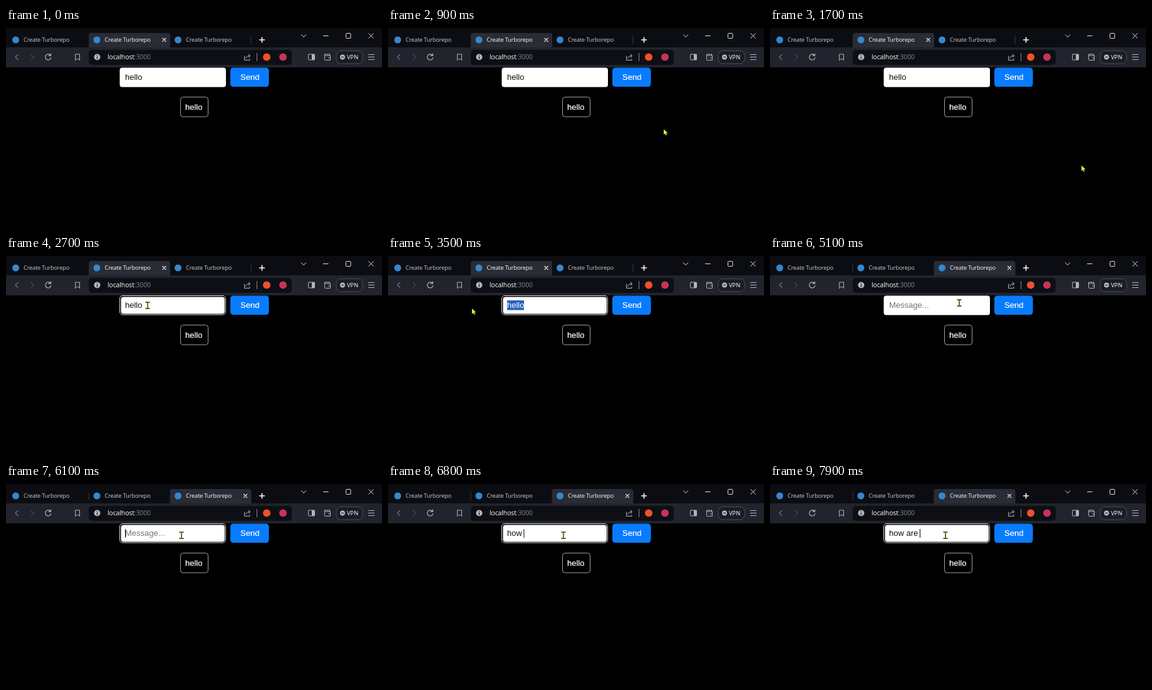
An HTML page that plays this animation: 600x320 px, repeating every 8000 ms.

```html
<!DOCTYPE html>
<html lang="en">
<head>
<meta charset="utf-8">
<title>Chat in browser tabs</title>
<style>
  html, body { margin: 0; width: 100%; height: 100%; overflow: hidden; background: #000; }
  svg { display: block; }
  text { font: 13px "Liberation Sans", Arial, sans-serif; white-space: pre; }
  .ui { font-family: "Open Sans", "Noto Sans", sans-serif; }
  .tab { font-size: 9.2px; letter-spacing: -.15px; }
  .bold { stroke: #fff; stroke-width: .2; }
  .line { fill: none; stroke: #b4b6bd; stroke-linecap: round; stroke-linejoin: round; }
  .thin { stroke-linecap: butt; stroke: #e4e4e8; }
</style>
</head>
<body>
<svg width="600" height="320" viewBox="0 0 600 320">
  <rect width="600" height="32" fill="#0c0d12"/>
  <g id="tabs"></g>
  <path class="line" d="M404.500 19h8M408.500 15v8" style="stroke:#fff;stroke-width:1.600"/>
  <path class="line thin" d="M471 10.500l4 4 4-4M506 12.500h8.500M578.500 8.500l8 8m0-8l-8 8"/>
  <rect class="line thin" x="542.500" y="8.500" width="7.500" height="8" rx="1"/>

  <!-- toolbar -->
  <rect y="31" width="600" height="32" fill="#21242c"/>
  <rect x="132" y="35" width="324" height="24" rx="5" fill="#0d0f14"/>
  <path class="line" d="M19 42.500l-4 4 4 4"/>
  <path class="line" d="M40 42.500l4 4-4 4" style="stroke:#5a5d66"/>
  <path class="line" d="M71 43.700a4.600 4.600 0 1 0 .8 4M71.500 41v3.200h-3.300" stroke-width="1.200"/>
  <path class="line" d="M111 42h6.500v9.500l-3.250-2.700-3.250 2.700z"/>
  <circle cx="145.500" cy="46.500" r="5" fill="#b4b6bd"/>
  <path d="M145.500 43.300v1.300m0 1.200v3.700" stroke="#0d0f14" stroke-width="1.300"/>
  <text class="ui" x="162" y="50" style="font-size:10.400px;letter-spacing:-.08px" fill="#fff">localhost<tspan fill="#83868f">:3000</tspan></text>
  <path class="line" d="M380.500 45v6.500h8.500v-2M382.500 48.500c.5-3 3-4 7-4m-2.700-2.700l2.900 2.700-2.900 2.700"/>
  <path class="line thin" d="M400.500 40v13" style="stroke:#8a8c94"/>
  <circle cx="416" cy="46.500" r="6" fill="#f0502c"/>
  <circle cx="442" cy="46.500" r="6" fill="#c73458"/>
  <rect class="line" x="482.500" y="42" width="10" height="9" rx="1.200"/>
  <path d="M488 42h4.500v9h-4.500z" fill="#b4b6bd"/>
  <path class="line" d="M516.500 44v-2h-8v8.500a1 1 0 0 0 1 1h8v-7.500h-9M514.500 47.800h3"/>
  <rect x="527" y="36.500" width="42" height="20.500" rx="7" fill="#1b1d24" stroke="#4b4e58"/>
  <circle cx="537" cy="46.500" r="4" fill="#b4b6bd"/>
  <path d="M535 46.500h4" stroke="#1b1d24" stroke-width="1.200"/>
  <text class="ui" x="544" y="50" style="font-size:9.300px" fill="#fff">VPN</text>
  <path class="line thin" d="M578 42.500h10m-10 4h10m-10 4h10" style="stroke:#b4b6bd"/>

  <!-- page -->
  <rect id="ring" x="181.500" y="63.500" width="169" height="30.500" rx="4.500" fill="#000" stroke="#dcdcdc"/>
  <rect id="field" rx="4" fill="#fff"/>
  <rect id="selection" x="190" y="71" width="27" height="15.500" fill="#2a60bd"/>
  <text id="value" x="190" y="83"></text>
  <path id="caret" d="M0 72v14" stroke="#000"/>
  <rect x="358" y="63.500" width="61.500" height="30.500" rx="4.500" fill="#087bff"/>
  <text class="bold" x="374" y="83.300" fill="#fff">Send</text>
  <rect x="278.500" y="110.500" width="44" height="31.500" rx="4" fill="#000" stroke="#a0a0a0"/>
  <text class="bold" x="286" y="131" fill="#fff">hello</text>

  <path id="arrow" d="M0 0v8.800l2-1.700 1.500 3 1.500-.8-1.400-2.800 2.900-.2z" fill="#d6f233"/>
  <path id="beam" d="M-3.500-5h2.500q1 0 1 1 0-1 1-1h2.500M0-4v8M-3.500 5h2.500q1 0 1-1 0 1 1 1h2.500" fill="none" stroke="#4e6a20" stroke-width="1.800"/>
</svg>
<script>
const LOOP = 8000;
const $ = id => document.getElementById(id);
const show = (id, on) => $(id).setAttribute("visibility", on ? "visible" : "hidden");
const set = (id, attrs) => Object.entries(attrs).forEach(([k, v]) => $(id).setAttribute(k, v));
const move = (id, x, y) => set(id, { transform: `translate(${x} ${y})` });

// [time, x, y, shape]; the pointer holds its place until the next entry
const pointer = [
  [500, 405, 119, "arrow"], [900, 440, 162, "arrow"], [1400, 466, 176, "arrow"],
  [1500, 480, 186, "arrow"], [1700, 497, 220, "arrow"], [1800, 462, 203, "arrow"],
  [1900, 410, 178, "arrow"], [2000, 355, 151, "arrow"], [2500, 252, 80, "beam"],
  [2700, 226, 79, "beam"], [2900, 212, 78, "beam"], [3200, 192, 78, "beam"],
  [3500, 134, 84, "arrow"], [3900, 160, 76, "arrow"], [4000, 205, 58, "arrow"],
  [4100, 252, 41, "arrow"], [4200, 290, 30, "arrow"], [4300, 306, 26, "arrow"],
  [4700, 306, 28, "arrow"], [5000, 304, 66, "beam"], [5100, 302, 75, "beam"],
  [5500, 286, 80, "beam"], [5600, 280, 82, "beam"]
];
const typing = "how are ";
const keyTimes = [6500, 6600, 6700, 6800, 7100, 7200, 7400, 7500];
const SWITCH = 4500, FOCUS = 5600;

[0, 1, 2].forEach(i => {
  const x = 2.5 + i * 129.5;
  $("tabs").insertAdjacentHTML("beforeend", `
    <path id="back${i}" d="M${x} 32v-20q0-4 4-4h122q4 0 4 4v20z"/>
    <path id="edge${i}" d="M${x + 129.5} 13v13" stroke="#363841"/>
    <circle cx="${x + 13}" cy="19" r="5.5" fill="#3488cf"/>
    <text id="title${i}" class="ui tab" x="${x + 25.5}" y="22.3">Create Turborepo</text>
    <path id="close${i}" class="line" d="M${x + 118} 16.5l5 5m0-5l-5 5" style="stroke:#f2f2f4;stroke-width:1.2"/>`);
});

function drawTabs(t) {
  const active = t < SWITCH ? 1 : 2;
  const hovered = t >= 4200 && t < SWITCH ? 2 : -1;
  for (let i = 0; i < 3; i++) {
    const lit = i === active || i === hovered;
    set("back" + i, { fill: i === active ? "#292c35" : "#171920" });
    set("title" + i, { fill: lit ? "#fff" : "#ccced4" });
    show("back" + i, lit);
    show("close" + i, lit);
    show("edge" + i, !lit && i + 1 !== active && i + 1 !== hovered);
  }
}

function drawField(t) {
  const second = t >= SWITCH;
  const focused = second ? t >= FOCUS : t >= 2700;
  const selected = !second && t >= 2900;
  const count = keyTimes.filter(k => t >= k).length;
  const typed = typing.slice(0, count);
  const lastKey = count ? keyTimes[count - 1] : FOCUS;
  const value = $("value");

  show("ring", focused);
  set("field", focused
    ? { x: 183.5, y: 65.5, width: 165.5, height: 27 }
    : { x: 181.5, y: 63.5, width: 169.5, height: 31 });
  show("selection", selected);
  value.textContent = second ? typed || "Message..." : "hello";
  value.setAttribute("fill", selected ? "#fff" : second && !typed ? "#757575" : "#111");
  show("caret", second && focused && t - lastKey < 600);
  move("caret", 190.5 + (count ? value.getComputedTextLength() - 1 : 0), 0);
}

function drawPointer(t) {
  const [, x, y, shape] = pointer.filter(p => t >= p[0]).pop() || [0, 0, 0, ""];
  for (const id of ["arrow", "beam"]) {
    show(id, id === shape);
    move(id, x, y);
  }
}

function frame() {
  const t = performance.now() % LOOP;
  drawTabs(t);
  drawField(t);
  drawPointer(t);
  requestAnimationFrame(frame);
}
frame();
</script>
</body>
</html>
```
